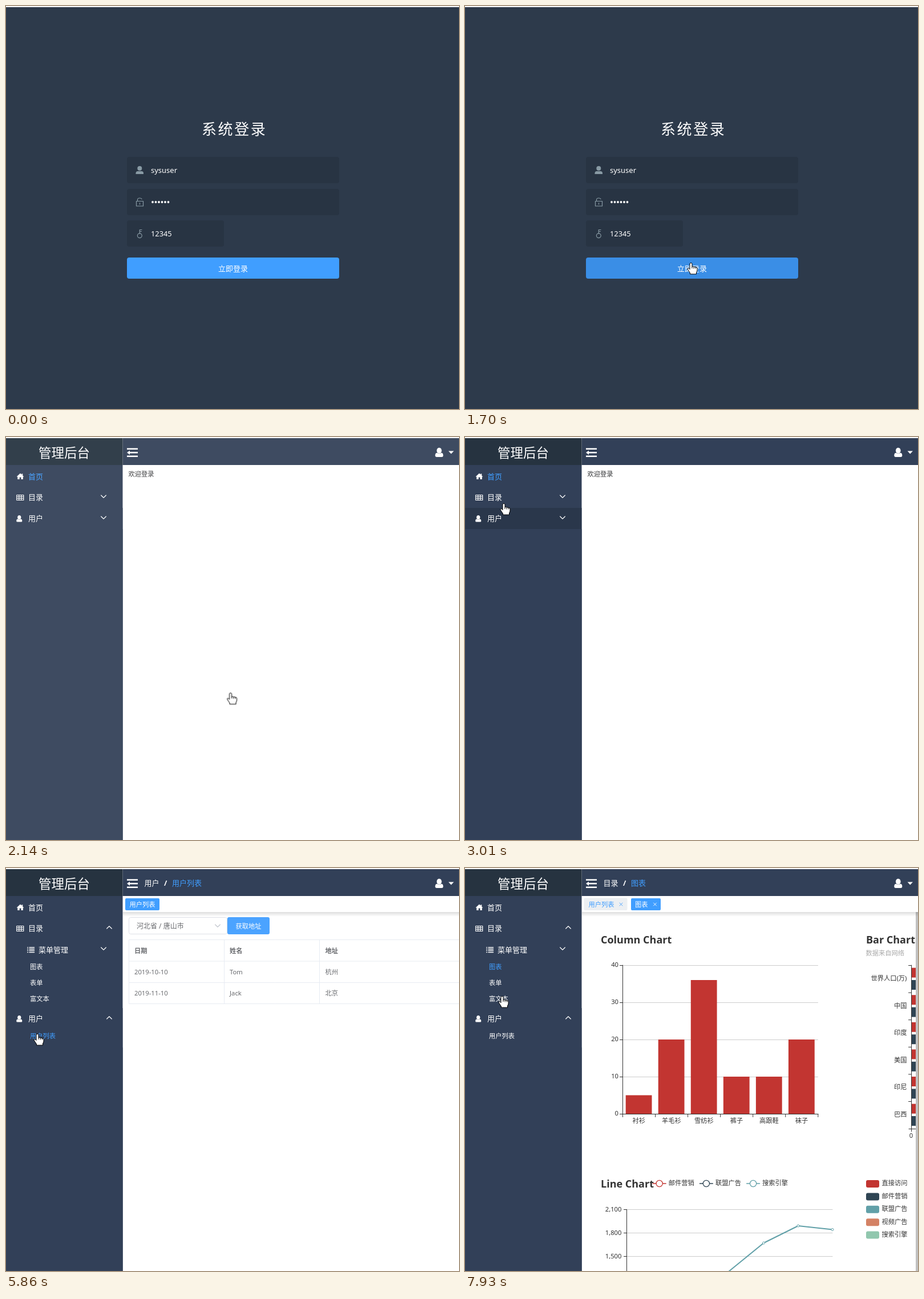
Recreate the animation shown at these times as an HTML page. Size 794 px wide and 705 px high, loop 8 s.

```html
<!DOCTYPE html>
<html lang="zh-CN">
<head>
<meta charset="utf-8">
<title>管理后台</title>
<style>
html, body { margin: 0; width: 100%; height: 100%; overflow: hidden; background: #fff; }
svg { display: block; width: 794px; height: 705px; }
text { font-family: "Noto Sans", "Noto Sans CJK SC", sans-serif; white-space: pre; }
.line { fill: none; stroke-linecap: round; stroke-linejoin: round; }
.grow { transform-box: fill-box; transform-origin: center; }
#bars { transform-origin: 0 430px; }
#sideBars { transform-origin: 783px 0; }
#dirArrow { transform-origin: 176px 104px; }
#userArrow { transform-origin: 176px 141px; }
#curve { stroke-dasharray: 1 1; }
</style>
</head>
<body>
<svg id="stage" viewBox="0 0 794 705"></svg>
<script>
const LOOP = 8000, BLUE = '#409eff', NAVY = '#324058';
const PALETTE = ['#c23531', '#2f4554', '#61a0a8', '#d48265', '#91c7ae'];

// Drawing helpers
const rect = (x, y, w, h, fill, extra = '') =>
  `<rect x="${x}" y="${y}" width="${w}" height="${h}" fill="${fill}" ${extra}/>`;
const text = (x, y, str, size, fill, extra = '') =>
  `<text x="${x}" y="${y}" font-size="${size}" fill="${fill}" ${extra}>${str}</text>`;
const small = (x, y, str, fill, extra) => text(x, y, str, 11.25, fill, extra);
const line = (d, color, width = 1, extra = '') =>
  `<path class="line" d="${d}" stroke="${color}" stroke-width="${width}" ${extra}/>`;
const shape = (d, fill) => `<path d="${d}" fill="${fill}"/>`;
const group = (id, ...parts) => `<g id="${id}">${parts.join('')}</g>`;
const repeat = (n, fn) => Array.from({ length: n }, (_, i) => fn(i)).join('');
const END = 'text-anchor="end"', MID = 'text-anchor="middle"', BOLD = 'font-weight="700"';
const chevron = (x, y, color = '#fff') => line(`M${x - 4.3} ${y - 2}l4.3 4.2 4.3 -4.2`, color, 1.2);
const person = (x, y, s, fill) => `<g transform="translate(${x} ${y}) scale(${s})" fill="${fill}">
  <ellipse cy="-2.4" rx="3.1" ry="3.6"/><path d="M-5 5.5V3.4Q-5 .5 -2.6 .4Q0 2.4 2.6 .4Q5 .5 5 3.4V4.2Q5 5.5 3.5 5.5H-3.5Q-5 5.5 -5 4.2Z"/></g>`;
const cross = (x, y, color) => line(`M${x - 2.5} ${y - 2.5}l5 5m0 -5l-5 5`, color, 0.9);

// Animation helpers: stops are keyed by milliseconds
const sheet = document.head.appendChild(document.createElement('style'));
const animate = (id, stops, timing = 'linear') => {
  const frames = Object.entries(stops).map(([ms, css]) => `${ms / LOOP * 100}%{${css}}`).join('');
  sheet.textContent += `@keyframes k-${id}{${frames}}#${id}{animation:k-${id} ${LOOP}ms ${timing} infinite}\n`;
};
const toggle = (id, on, off, ranges) => {
  const stops = { 0: off };
  for (const [from, to] of ranges) {
    stops[from] = on;
    stops[to] = to === LOOP ? on : off;
  }
  if (!stops[LOOP]) stops[LOOP] = off;
  animate(id, stops, 'step-end');
};
const show = (id, ...ranges) => toggle(id, 'visibility:visible', 'visibility:hidden', ranges);
const highlight = (id, from, to) => toggle(id, `fill:${BLUE}`, 'fill:#fff', [[from, to]]);
const ramp = (id, from, to, start, end, easing = 'ease') => animate(id, {
  0: start, [from]: `${start};animation-timing-function:${easing}`, [to]: end, [LOOP]: end });
const fadeIn = (id, from) => ramp(id, from, from + 500, 'opacity:0', 'opacity:1');

const login = () => {
  const icon = '#889aa4', field = '#283443';
  return group('login',
    rect(0, 2, 794, 703, '#2d3a4b'),
    text(343, 224.5, '系统登录', 26, '#fff', 'letter-spacing="2.6"'),
    rect(212, 264, 372, 46, field, 'rx="4"'),
    rect(212, 320, 372, 46, field, 'rx="4"'),
    rect(212, 375, 170, 46, field, 'rx="4"'),
    `<circle cx="234.3" cy="284" r="4" fill="${icon}"/>`,
    shape('M227.5 294V292.5Q227.5 289 231 289H237.5Q241 289 241 292.5V294Z', icon),
    line('M228.5 341.5h12v8.5h-12zM230.5 341v-2q0 -3 4 -3q2.5 0 3.5 1.8M234.5 344.5v2.5', icon, 1.2),
    line('M234.3 397.8V391.5H238M234.3 394.5H237.5', icon, 1.2),
    `<circle cx="234.3" cy="401.8" r="3.9" fill="none" stroke="${icon}" stroke-width="1.2"/>`,
    text(254, 292, 'sysuser', 13, '#fff'),
    line('M257 343h28', '#fff', 3.8, 'stroke-dasharray="0 5.5"'),
    text(254, 403, '12345', 12.8, '#fff'),
    rect(212, 440, 372, 37, BLUE, 'rx="4" id="submit"'),
    text(398, 463.7, '立即登录', 13, '#fff', MID));
};

const sidebar = () => {
  const row = (id, y) => rect(0, y, 204, 37, '#2a374b', `id="${id}"`);
  const label = (x, y, str, id = '') => text(x, y, str, 13, '#fff', `id="${id}"`);
  return [
    rect(0, 2, 204.5, 703, NAVY),
    rect(0, 2, 204.5, 47, '#263340'),
    text(102, 36, '管理后台', 22.5, '#fff', MID),
    row('dirHover', 87),
    label(39, 73.5, '首页', 'homeItem'),
    label(39, 110, '目录'),
    group('dirArrow', chevron(171, 104)),
    group('dirIcons',
      shape('M18.5 69.5L25 63.5 27.5 65.8V64.3H29.3V67.5L31.5 69.5H29.8V74H26.5V70.5H23.7V74H20.3V69.5Z', '#fff'),
      line('M18.8 101.5h12v9h-12zM18.8 104.5h12M18.8 107.5h12M22.8 101.5v9M26.8 101.5v9', '#fff', 1.2)),
    group('subMenu',
      line('M37.8 139h.6M37.8 141.8h.6M37.8 144.6h.6M37.8 147.4h.6M41 139h8.5M41 141.8h8.5M41 144.6h8.5M41 147.4h8.5', '#fff', 1.5),
      label(57, 147.5, '菜单管理'), chevron(171, 141),
      small(42, 177.3, '图表', '#fff', 'id="chartItem"'),
      small(42, 205.3, '表单', '#fff'),
      small(42, 233.3, '富文本', '#fff')),
    group('userMenu',
      rect(0, 124, 204.5, 700, NAVY),
      small(42, 177.3, '用户列表', '#fff', 'id="listItem"'),
      rect(0, 161, 204.5, 600, NAVY, 'id="cover"'),
      row('userHover', 124),
      group('userIcon', person(23.3, 143, 1, '#fff')),
      label(39, 147.3, '用户'),
      group('userArrow', chevron(171, 141)))
  ].join('');
};

const crumbs = (id, first, second) => group(id,
  text(242.5, 31, first, 13, '#fff'),
  text(277, 31, '/', 13, '#fff', BOLD),
  text(291, 31, second, 13, BLUE));

const header = () => [
  rect(205, 2, 589, 47, NAVY),
  shape('M212 19.5h19v2.6h-19zM219 26h12v2.6h-12zM212 32.5h19v2.6h-19zM212 27.3l5 -3.6v2.3h2v2.6h-2v2.3z', '#fff'),
  shape('M775.5 24.5h9.5l-4.75 5z', '#fff'),
  group('accountIcon', person(759.3, 27.2, 1.4, '#fff')),
  crumbs('listCrumbs', '用户', '用户列表'),
  crumbs('chartCrumbs', '目录', '图表')
].join('');

const tags = () => group('tags',
  rect(205, 77, 589, 8, 'url(#shade)'),
  rect(205, 49, 589, 28, '#fff'),
  group('soloTag',
    rect(209, 53, 60, 21, BLUE, 'rx="2"'),
    small(216.5, 67.8, '用户列表', '#fff')),
  group('tagPair',
    rect(208.5, 52.5, 76, 21.5, '#eceff2', 'rx="2"'),
    small(216.5, 67.8, '用户列表', BLUE), cross(273.5, 63.5, BLUE),
    rect(291, 53, 52, 21, BLUE, 'rx="2"'),
    small(298, 67.8, '图表', '#fff'), cross(333, 63.5, '#fff')));

const table = () => {
  const columns = [225, 392, 559.5];
  const cells = (y, values, fill, extra) =>
    values.map((v, i) => small(columns[i], y, v, fill, extra)).join('');
  return group('table', group('tableFade',
    rect(215.5, 86.5, 172, 29, '#fff', 'rx="3" stroke="#dcdfe6"'),
    text(229, 105.7, '河北省 / 唐山市', 12, '#606266'),
    chevron(371, 101, '#c0c4cc'),
    rect(388, 86, 74, 30, BLUE, 'rx="3"'),
    small(425, 105.5, '获取地址', '#fff', MID + ' font-weight="500"'),
    line('M794 125.5H215.5V237.5H794M215.5 163H794M215.5 200.5H794M382.5 125.5V237.5M549.5 125.5V237.5', '#e6eaf2'),
    cells(149, ['日期', '姓名', '地址'], '#606266', BOLD),
    cells(186, ['2019-10-10', 'Tom', '杭州'], '#606266'),
    cells(223, ['2019-11-10', 'Jack', '北京'], '#606266')));
};

const title = (x, y, str) => text(x, y, str, 18, '#333', BOLD);

const columnChart = () => {
  const band = 57.05, values = [5, 20, 36, 10, 10, 20];
  const names = ['衬衫', '羊毛衫', '雪纺衫', '裤子', '高跟鞋', '袜子'];
  return title(238, 132, 'Column Chart')
    + repeat(4, i => line(`M277 ${170.5 + 65 * i}H618.5`, '#ccc'))
    + group('bars', values.map((v, i) => rect(281.7 + band * i, 430 - 6.5 * v, 45.8, 6.5 * v, PALETTE[0])).join(''))
    + line('M276.5 170V430.5H619', '#333')
    + repeat(5, i => line(`M271.5 ${170.5 + 65 * i}h5`, '#333')
      + small(269, 173 + 65 * i, 40 - 10 * i, '#333', END))
    + repeat(7, i => line(`M${276.5 + band * i} 430.5v5`, '#333'))
    + names.map((n, i) => small(304.8 + band * i, 446, n, '#333', MID)).join('');
};

const barChart = () => {
  const band = 47.6, names = ['世界人口(万)', '中国', '印度', '美国', '印尼', '巴西'];
  return title(703, 132, 'Bar Chart')
    + small(702.5, 153, '数据来自网络', '#aaa')
    + group('sideBars', repeat(6, i => rect(783, 174.6 + band * i, 7, 17, PALETTE[0])
      + rect(783, 196 + band * i, 7, 17, PALETTE[1])))
    + line('M782.5 170V461M778 456.5H790', '#333')
    + repeat(6, i => line(`M777.5 ${170.5 + band * i}h5`, '#333'))
    + names.map((n, i) => small(774.5, 197 + band * i, n, '#333', END)).join('')
    + small(782, 472, '0', '#333', MID);
};

const lineChart = () => {
  const points = [[523.5, 656], [584, 626], [644, 632.5]];
  return title(238, 559, 'Line Chart')
    + ['邮件营销', '联盟广告', '搜索引擎'].map((n, i) => {
      const x = 340.7 + 82.2 * i;
      return line(`M${x - 11.5} 552h23`, PALETTE[i], 1.3)
        + `<circle cx="${x}" cy="552" r="5.6" fill="#fff" stroke="${PALETTE[i]}" stroke-width="1.3"/>`
        + small(x + 16, 555.3, n, '#333');
    }).join('')
    + repeat(3, i => line(`M284 ${597.5 + 41 * i}H644`, '#ccc')
      + line(`M278.5 ${597.5 + 41 * i}h5`, '#333')
      + small(274.5, 600.5 + 41 * i, ['2,100', '1,800', '1,500'][i], '#333', END))
    + line('M283.5 597.5V705', '#333')
    + line('M462 706L' + points.join('L'), PALETTE[2], 2, 'id="curve" pathLength="1"')
    + points.map(([x, y], i) =>
      `<circle class="grow" id="dot${i}" cx="${x}" cy="${y}" r="2" fill="#fff" stroke="${PALETTE[2]}"/>`).join('');
};

const pieLegend = () => ['直接访问', '邮件营销', '联盟广告', '视频广告', '搜索引擎'].map((n, i) =>
  rect(703, 546 + 22.4 * i, 23, 13, PALETTE[i], 'rx="3"')
  + small(730.5, 555.3 + 22.4 * i, n, '#333')).join('');

const charts = () => group('charts',
  group('chartFade', columnChart(), barChart(), lineChart(), pieLegend()),
  rect(790, 77, 4, 628, '#c1c1c1'));

const cursor = () => group('cursor', group('pointer',
  `<g id="arrow"><path d="M0 0V16L4 12.5 6.5 18.5 9 17.5 6.5 11.5H11.5Z" fill="#fff" stroke="#000"/></g>`,
  `<g id="hand" stroke="#000" stroke-linejoin="round"><path fill="#fff" d="M-2 1.5Q0 -1 2 1.5V7Q4 5.8 5.2 7.4Q7.2 6.4 8.3 8Q10.7 7.4 11 9.8V13Q11 15 9.5 17V20H-1.5V18L-5.5 12Q-6.7 9.8 -4.7 9.6Q-3.3 9.8 -2 11.6Z"/>
    <path fill="none" d="M2 7v3M5.2 7.5v3M8.3 8v2.5"/></g>`));

document.getElementById('stage').innerHTML =
  `<defs><linearGradient id="shade" x2="0" y2="1"><stop stop-opacity=".13"/><stop offset="1" stop-opacity="0"/></linearGradient></defs>`
  + rect(0, 0, 794, 705, '#fff') + login()
  + group('app',
    group('home', small(214.5, 68.5, '欢迎登录', '#303133')),
    table(), charts(), tags(), header(), sidebar())
  + cursor();

// Login and page changes
const OPEN_APP = 1790, OPEN_LIST = 5510, OPEN_CHARTS = 6940;
show('login', [0, OPEN_APP]);
animate('submit', { 0: `fill:${BLUE}`, 1130: `fill:${BLUE}`, 1230: 'fill:#66b1ff', 1560: 'fill:#66b1ff',
  1660: 'fill:#3a8ee6', [LOOP]: 'fill:#3a8ee6' });
fadeIn('app', OPEN_APP);
for (const id of ['dirIcons', 'userIcon', 'accountIcon']) show(id, [2040, LOOP]);
show('home', [0, OPEN_LIST]);
show('tags', [OPEN_LIST, LOOP]);
for (const id of ['table', 'listCrumbs', 'soloTag']) show(id, [OPEN_LIST, OPEN_CHARTS]);
for (const id of ['charts', 'chartCrumbs', 'tagPair']) show(id, [OPEN_CHARTS, LOOP]);
fadeIn('tableFade', OPEN_LIST);
fadeIn('chartFade', 6980);

// Menu
highlight('homeItem', 1, OPEN_LIST);
highlight('listItem', OPEN_LIST, OPEN_CHARTS);
highlight('chartItem', OPEN_CHARTS, LOOP);
show('dirHover', [3080, 3640]);
show('userHover', [2850, 3080], [3980, 4960], [6050, 6180]);
show('subMenu', [3340, LOOP]);
const turn = ['transform:rotate(0deg)', 'transform:rotate(180deg)'];
ramp('dirArrow', 3340, 3640, ...turn);
ramp('userMenu', 3340, 3640, 'transform:translateY(0px)', 'transform:translateY(121px)', 'ease-in-out');
ramp('userArrow', 4200, 4500, ...turn);
ramp('cover', 4200, 4500, 'transform:translateY(0px)', 'transform:translateY(32px)', 'ease-in-out');

// Charts
const CUBIC_OUT = 'cubic-bezier(.215,.61,.355,1)';
ramp('bars', 6710, 7710, 'transform:scaleY(0)', 'transform:scaleY(1)', CUBIC_OUT);
ramp('sideBars', 6710, 7100, 'transform:scaleX(0)', 'transform:scaleX(1)', CUBIC_OUT);
ramp('curve', 7700, 7920, 'stroke-dashoffset:1', 'stroke-dashoffset:0', 'linear');
for (let i = 0; i < 3; i++) ramp('dot' + i, 7100, 7700, 'transform:scale(.2)', 'transform:scale(1)');

// Pointer
show('cursor', [150, LOOP]);
show('arrow', [150, 1130], [2150, 2820]);
show('hand', [1130, 2150], [2820, LOOP]);
const path = {
  0: [716, 699], 200: [716, 699], 1030: [396, 453], 1160: [396, 449], 2100: [396, 449], 2200: [390, 445],
  2420: [390, 445], 2900: [80, 142], 3010: [68, 116], 3230: [64, 106], 3560: [64, 106], 4120: [55, 256],
  4300: [55, 256], 4760: [47, 268], 4930: [47, 268], 5320: [55, 290], 5980: [55, 290], 6060: [57, 262],
  6730: [60, 176], 7050: [60, 176], 7160: [61, 189], 7260: [61, 189], 7710: [61, 196], 7930: [65, 224], 8000: [65, 224]
};
animate('pointer', Object.fromEntries(Object.entries(path).map(
  ([ms, [x, y]]) => [ms, `transform:translate(${x}px,${y}px)`])));
</script>
</body>
</html>
```
